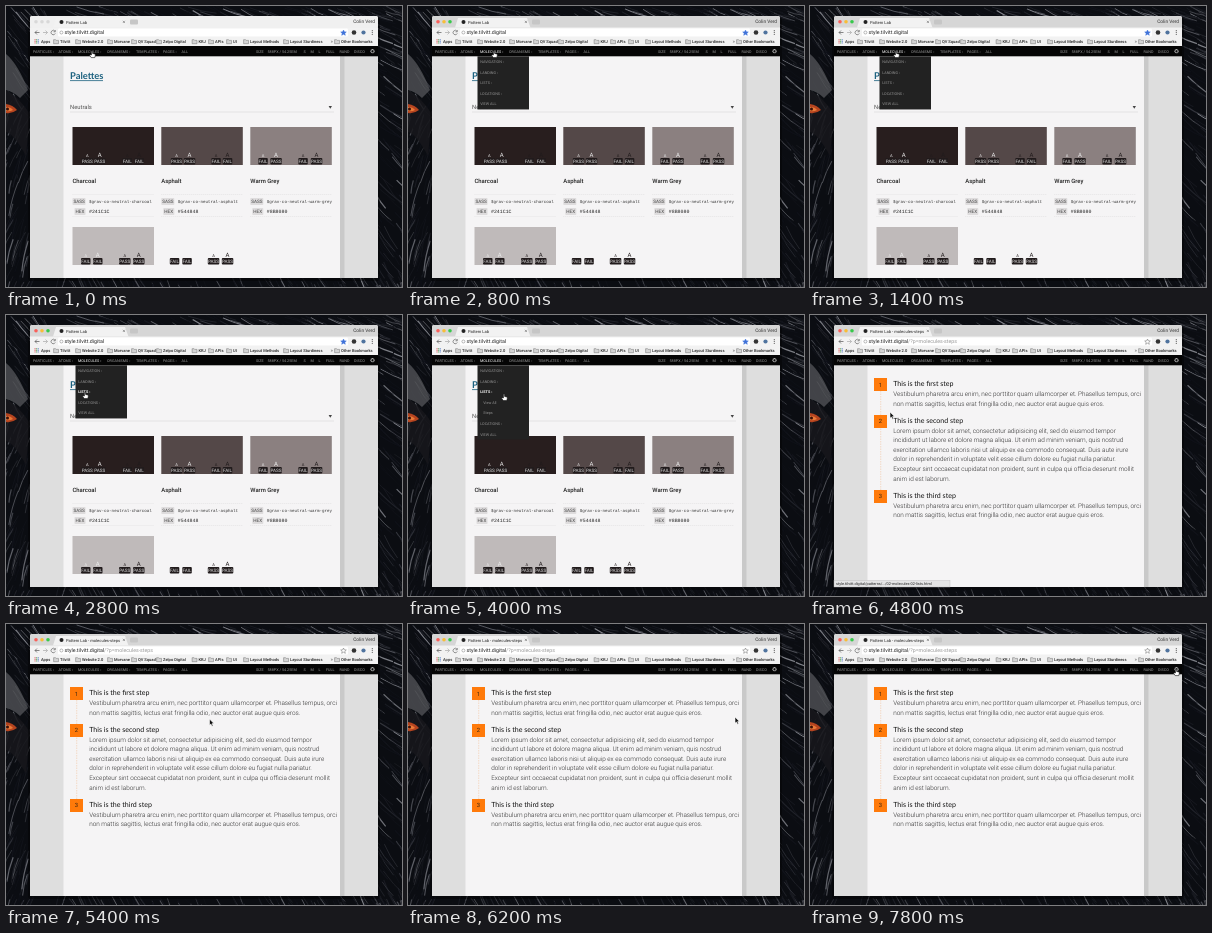
Write an HTML page that moves like this. It is 396x281 px and loops after 8000 ms.

```html
<!DOCTYPE html>
<html lang="en">
<head>
<meta charset="utf-8">
<title>Pattern library walkthrough</title>
<style>
  html, body { margin: 0; width: 100%; height: 100%; overflow: hidden; background: #08090c; }
  svg { display: block; width: 100%; height: 100%; }
  text { font-family: Roboto, sans-serif; text-rendering: geometricPrecision; white-space: pre; }
  .mono { font-family: "Liberation Mono", monospace; }
  .lato { font-family: Lato, sans-serif; }
</style>
</head>
<body>
<svg id="stage" viewBox="0 0 396 281"></svg>
<script>
const LOOP = 8000, STEP = 200;
const stage = document.getElementById('stage');

function add(parent, tag, attrs = {}, content) {
  const node = document.createElementNS('http://www.w3.org/2000/svg', tag);
  for (const key in attrs) node.setAttribute(key, attrs[key]);
  if (content !== undefined) node.textContent = content;
  return parent.appendChild(node);
}
const group = parent => add(parent, 'g');
const rect = (parent, x, y, width, height, fill, extra) =>
  add(parent, 'rect', { x, y, width, height, fill, ...extra });
const circle = (parent, cx, cy, r, fill, extra) =>
  add(parent, 'circle', { cx, cy, r, fill, ...extra });
const line = (parent, d, stroke, width = 0.6, extra) =>
  add(parent, 'path', { d, stroke, fill: 'none', 'stroke-width': width, ...extra });
const text = (parent, x, y, size, fill, content, extra) =>
  add(parent, 'text', { x, y, 'font-size': size, fill, ...extra }, content);

function seeded(seed) {
  return () => (seed = (seed * 16807) % 2147483647) / 2147483647;
}

// Dark feathered wallpaper with a glowing eye
function drawWallpaper() {
  const g = group(stage), random = seeded(77);
  rect(g, 0, 0, 396, 281, '#0b0d12');
  for (let i = 0; i < 560; i++) {
    const side = i % 4, along = random(), across = random();
    const x = side === 0 ? across * 26 : side === 1 ? 362 + across * 34 : along * 396;
    const y = side < 2 ? along * 281 : side === 2 ? across * 11 : 268 + across * 12;
    const slope = x < 60 ? (y < 90 ? 0.9 : 1.9) : 0.35 + 0.7 * y / 281;
    const angle = slope + (random() - 0.5) * 0.35;
    const length = 10 + random() * 26;
    const dx = Math.cos(angle) * length, dy = Math.sin(angle) * length;
    const shade = 14 + random() ** 3 * 120;
    line(g, `M${x} ${y}q${dx * 0.5 - dy * 0.06} ${dy * 0.5 + dx * 0.06} ${dx} ${dy}`,
      `rgb(${shade},${shade + 2},${shade + 9})`, 0.4 + random() * 0.9);
  }
  add(g, 'path', { d: 'M0 48Q12 58 22 84L14 92Q8 86 0 84Z', fill: '#55565a', opacity: 0.75 });
  add(g, 'path', { d: 'M0 84Q12 90 24 108L20 150Q8 128 0 126Z', fill: '#17171c', opacity: 0.85 });
  add(g, 'path', { d: 'M0 98Q7 99 11 104Q6 108 0 107Z', fill: '#b5441f' });
  add(g, 'path', { d: 'M0 101Q5 101 7 104Q4 106 0 105Z', fill: '#e87938' });
  circle(g, 1.5, 103, 1.5, '#3a1008');
}

function drawBrowser() {
  const g = group(stage);
  rect(g, 22, 11, 352, 264, '#000', { rx: 3, opacity: 0.4 });
  rect(g, 24, 10, 348, 262, '#dcdcdc', { rx: 2 });
  const titleBar = rect(g, 24, 10, 348, 12, '#d6d6d6', { rx: 2 });
  add(g, 'path', { d: 'M47 21.5L50 12H119L122.5 21.5Z', fill: '#f2f2f2' });
  const lights = [30, 36, 42].map(x => circle(g, x, 15.8, 1.8, '#ddd'));
  circle(g, 55.5, 16, 2, '#222');
  const tabTitle = text(g, 60, 17.6, 4.1, '#222', '');
  line(g, 'M116.8 14.8l2.2 2.2m0-2.2l-2.2 2.2', '#555', 0.5);
  rect(g, 124, 13.5, 8, 5, '#c6c6c6', { rx: 1 });
  text(g, 369, 17.3, 4.8, '#333', 'Colin Verd', { 'text-anchor': 'end' });

  rect(g, 24, 21.5, 348, 18.5, '#f2f2f2');
  line(g, 'M33.5 26.5H29m2-2l-2 2l2 2', '#555', 0.7);
  line(g, 'M37 26.5h4.5m-2-2l2 2l-2 2', '#aaa', 0.7);
  line(g, 'M49 25.2a2.2 2.2 0 1 0 .3 2.2M49.3 24v1.8h-1.8', '#555', 0.6);
  rect(g, 52, 22.5, 290, 8, '#fff', { rx: 1.2 });
  circle(g, 55.4, 26.5, 1.5, 'none', { stroke: '#777', 'stroke-width': 0.5 });
  const address = text(g, 58.5, 28.4, 5.25, '#222', 'style.tilvitt.digital');
  const path = add(address, 'tspan', { fill: '#999' });
  const star = add(g, 'path', {
    d: 'M337.5 24l.8 1.8l2 .2l-1.5 1.3l.5 2l-1.8-1.1l-1.8 1.1l.5-2l-1.5-1.3l2-.2z', 'stroke-width': 0.5 });
  circle(g, 348, 26.5, 2.3, '#333');
  circle(g, 357.5, 26.5, 2.1, '#4f739e');
  [24.7, 26.5, 28.3].forEach(y => circle(g, 366.3, y, 0.6, '#555'));

  for (let i = 0; i < 9; i++)
    rect(g, 28.5 + i % 3 * 1.6, 33.2 + Math.floor(i / 3) * 1.6, 1.1, 1.1, ['#d66', '#6a6', '#68c'][i % 3]);
  const label = (x, content) => text(g, x, 37, 4.05, '#222', content, { 'font-weight': 500 });
  label(35, 'Apps');
  const bookmarks = [[54, 'Tilvitt'], [76, 'Website 2.0'], [108, 'Morvane'], [132, 'QV Squad'],
    [157, 'Zelpo Digital'], [192.5, 'KRJ'], [209, 'APIs'], [227, 'UI'],
    [244, 'Layout Methods'], [284, 'Layout Sturdiness'], [335, 'Other Bookmarks']];
  for (const [x, content] of bookmarks) {
    add(g, 'path', { d: `M${x - 6.4} 33.7h2l.6.7h2.3v3.3h-4.9z`, fill: '#d4d4d4', stroke: '#666', 'stroke-width': 0.45 });
    label(x, content);
  }
  text(g, 324.5, 37.2, 5, '#555', '»');
  return { titleBar, lights, tabTitle, path, star };
}

function drawNavigation() {
  const g = group(stage);
  rect(g, 24, 40, 348, 10.3, '#050505');
  const items = [[27, 'PARTICLES ›'], [52.5, 'ATOMS ›'], [72, 'MOLECULES ›'], [101, 'ORGANISMS ›'],
    [130, 'TEMPLATES ›'], [157, 'PAGES ›'], [175.5, 'ALL'], [250, 'SIZE'],
    [261.5, '588PX / 54.25EM'], [297.5, 'S'], [304.5, 'M'], [312.5, 'L'], [320, 'FULL'], [333.5, 'RAND'], [348, 'DISCO']];
  const labels = items.map(([x, label]) => text(g, x, 46.5, 3.75, '#9b9b9b', label));
  circle(g, 366.5, 45.2, 1.6, 'none', { stroke: '#bbb', 'stroke-width': 1.1, 'stroke-dasharray': '1 .25' });
  return labels[2];
}

function drawPageFrame() {
  const g = group(stage);
  rect(g, 24, 50, 348, 222, '#dedede');
  rect(g, 57.5, 50, 276.5, 222, '#f5f4f5');
  rect(g, 334, 50, 4.5, 222, '#c9c9c9');
}

function drawSwatch(g, x, y, fill, results, light, dark) {
  rect(g, x, y, 81.5, 38, fill);
  results.forEach(([offset, label], i) => {
    const width = label === 'PASS' ? 11.5 : 9.5;
    const centre = x + offset + width / 2;
    text(g, centre, y + 29.5, i % 2 ? 6 : 4, i < 2 ? light : dark, 'A', { 'text-anchor': 'middle' });
    rect(g, x + offset, y + 31, width, 6.4, '#211b1c', { rx: 1 });
    text(g, centre, y + 35.9, 4.6, '#ddd', label, { 'text-anchor': 'middle' });
  });
}

function drawPalettes() {
  const g = group(stage);
  text(g, 64, 73, 9.4, '#1c617f', 'Palettes', { class: 'lato', 'font-weight': 700 });
  line(g, 'M64 74.6H97', '#1c617f', 0.8);
  text(g, 64, 103, 5.85, '#555', 'Neutrals');
  line(g, 'M64 106H328', '#cfcfcf', 0.5);
  add(g, 'path', { d: 'M322.6 100h3.4l-1.7 2.8z', fill: '#444' });

  const verdicts = (offsets, words) => offsets.map((offset, i) => [offset, words[i]]);
  const P = 'PASS', F = 'FAIL', white = '#eee', black = '#211b1c';
  drawSwatch(g, 66.5, 121, '#281e1e', verdicts([9, 21.5, 50, 62], [P, P, F, F]), white, black);
  drawSwatch(g, 155.3, 121, '#544848', verdicts([9.5, 22.5, 50, 61.5], [P, P, F, F]), white, black);
  drawSwatch(g, 244.3, 121, '#8b8080', verdicts([8, 20, 48, 60.5], [F, P, F, P]), white, black);
  drawSwatch(g, 66.5, 221, '#bfbaba', verdicts([8.5, 20.5, 46.5, 60.5], [F, F, P, P]), white, black);
  drawSwatch(g, 155.3, 221, '#f5f4f5', verdicts([8.5, 21, 46.5, 60.5], [F, F, P, P]), '#f5f4f5', black);

  const colours = [[66.5, 'Charcoal', 'charcoal', '#241C1C'], [155.3, 'Asphalt', 'asphalt', '#544848'],
    [244.3, 'Warm Grey', 'warm-grey', '#8B8080']];
  for (const [x, name, token, hex] of colours) {
    text(g, x, 176.6, 5.9, '#222', name, { 'font-weight': 500 });
    line(g, `M${x} 188.5h81.5m-81.5 22h81.5`, '#d5d5d5', 0.5, { 'stroke-dasharray': '1 1' });
    rect(g, x, 192, 13, 7, '#dedcdd', { rx: 0.8 });
    rect(g, x + 2, 202, 11, 7, '#dedcdd', { rx: 0.8 });
    text(g, x + 1, 197.3, 4.6, '#444', 'SASS');
    text(g, x + 3, 207.2, 4.6, '#444', 'HEX');
    text(g, x + 16.5, 197, 4.2, '#333', `$grav-co-neutral-${token}`, { class: 'mono' });
    text(g, x + 16.5, 207.2, 4.9, '#222', hex, { class: 'mono' });
  }
  return g;
}

function drawSteps() {
  const g = group(stage);
  line(g, 'M70.7 76V175', '#f2cfb4', 0.7, { 'stroke-dasharray': '1.5 1' });
  const vestibulum = [
    'Vestibulum pharetra arcu enim, nec porttitor quam ullamcorper et. Phasellus tempus, orci',
    'non mattis sagittis, lectus erat fringilla odio, nec auctor erat augue quis eros.'];
  const lorem = [
    'Lorem ipsum dolor sit amet, consectetur adipisicing elit, sed do eiusmod tempor',
    'incididunt ut labore et dolore magna aliqua. Ut enim ad minim veniam, quis nostrud',
    'exercitation ullamco laboris nisi ut aliquip ex ea commodo consequat. Duis aute irure',
    'dolor in reprehenderit in voluptate velit esse cillum dolore eu fugiat nulla pariatur.',
    'Excepteur sint occaecat cupidatat non proident, sunt in culpa qui officia deserunt mollit',
    'anim id est laborum.'];
  const steps = [[71, 'first', vestibulum], [107.5, 'second', lorem], [182.7, 'third', vestibulum]];
  steps.forEach(([y, ordinal, lines], i) => {
    rect(g, 64, Math.round(y - 8), 13, 13, '#ff7a0a');
    text(g, 70.5, y + 0.6, 5.8, '#3a2410', i + 1, { 'text-anchor': 'middle' });
    text(g, 83.2, y, 7.05, '#111', `This is the ${ordinal} step`, { class: 'lato' });
    lines.forEach((content, row) =>
      text(g, 83.2, y + 10 + row * 9.65, 6.36, '#2c2c2c', content, { 'font-weight': 300 }));
  });
  return g;
}

function drawMenu(entries, activeLabel) {
  const g = group(stage);
  const height = entries.length * 10.55 + 0.4;
  rect(g, 69.5, 50.3, 51.5, height, '#222');
  entries.forEach(([label, indent = 0], i) => {
    const active = label === activeLabel;
    text(g, 72.2 + indent, 57.2 + i * 10.55, 3.75, active ? '#fff' : '#929292', label,
      { 'font-weight': active ? 700 : 400 });
  });
  return g;
}

function drawStatus() {
  const g = group(stage);
  rect(g, 24, 265.5, 116, 6.5, '#e4e4e4', { stroke: '#bbb', 'stroke-width': 0.4 });
  text(g, 26, 270, 3.85, '#222', 'style.tilvitt.digital/patterns/…/02-molecules-02-lists.html');
  return g;
}

function drawCursor(d, fill, stroke) {
  return add(stage, 'path', { d, fill, stroke, 'stroke-width': 0.6, 'stroke-linejoin': 'round' });
}

drawWallpaper();
const browser = drawBrowser();
drawPageFrame();
const palettes = drawPalettes();
const steps = drawSteps();
const moleculesLabel = drawNavigation();
const before = [['NAVIGATION ›'], ['LANDING ›']];
const after = [['LOCATIONS ›'], ['VIEW ALL']];
const lists = [['LISTS ›']];
const menu = drawMenu([...before, ...lists, ...after]);
const hoverMenu = drawMenu([...before, ...lists, ...after], 'LISTS ›');
const openMenu = drawMenu([...before, ...lists, ['View All', 3], ['Steps', 3], ...after], 'LISTS ›');
const status = drawStatus();
const arrow = drawCursor('M0 0V6.2L1.4 5L2.5 7.2L3.6 6.7L2.6 4.6H4.5Z', '#111', '#fff');
const hand = drawCursor('M-.6.5Q0-.3.6.5V2.4L2.8 3Q3.5 3.3 3.3 4.4L2.8 6.6H-.8L-2.4 4.2Q-2.2 3.2-.6 4Z', '#fff', '#111');

const cursorPath = [[0, 86, 45], [1600, 86, 45], [2400, 79, 77], [3400, 79, 77], [3800, 96, 79],
  [4000, 96, 79], [4400, 80, 97], [5000, 80, 97], [5800, 327, 93], [6400, 327, 93], [7400, 366, 45], [LOOP, 366, 45]];

function cursorAt(time) {
  const next = cursorPath.findIndex(key => key[0] > time);
  const [t0, x0, y0] = cursorPath[next - 1], [t1, x1, y1] = cursorPath[next];
  const u = (time - t0) / (t1 - t0), eased = u * u * (3 - 2 * u);
  return [x0 + (x1 - x0) * eased, y0 + (y1 - y0) * eased];
}

const show = (node, visible) => node.setAttribute('display', visible ? 'inline' : 'none');

function render(time) {
  const focused = time >= 400, loaded = time >= 4800;
  const menuOpen = focused && !loaded;
  const [x, y] = cursorAt(time);
  const overLink = time < 4800 || time >= 7200;

  browser.titleBar.setAttribute('fill', focused ? '#d6d6d6' : '#f0f0f0');
  browser.lights.forEach((light, i) =>
    light.setAttribute('fill', focused ? ['#f9605a', '#f8bd37', '#37c84b'][i] : '#d8d8d8'));
  browser.tabTitle.textContent = loaded ? 'Pattern Lab - molecules-steps' : 'Pattern Lab';
  browser.path.textContent = loaded ? '/?p=molecules-steps' : '';
  browser.star.setAttribute('fill', loaded ? '#fff' : '#3f72d9');
  browser.star.setAttribute('stroke', loaded ? '#666' : '#3f72d9');
  moleculesLabel.setAttribute('fill', menuOpen ? '#fff' : '#9b9b9b');

  show(palettes, !loaded);
  show(steps, loaded);
  show(menu, menuOpen && time < 2200);
  show(hoverMenu, time >= 2200 && time < 3200);
  show(openMenu, time >= 3200 && !loaded);
  show(status, time >= 4400 && time < 5200);
  show(arrow, !overLink);
  show(hand, overLink);
  for (const cursor of [arrow, hand]) cursor.setAttribute('transform', `translate(${x} ${y})`);
}

function tick() {
  render(Math.floor(performance.now() % LOOP / STEP) * STEP);
  requestAnimationFrame(tick);
}
tick();
</script>
</body>
</html>
```
